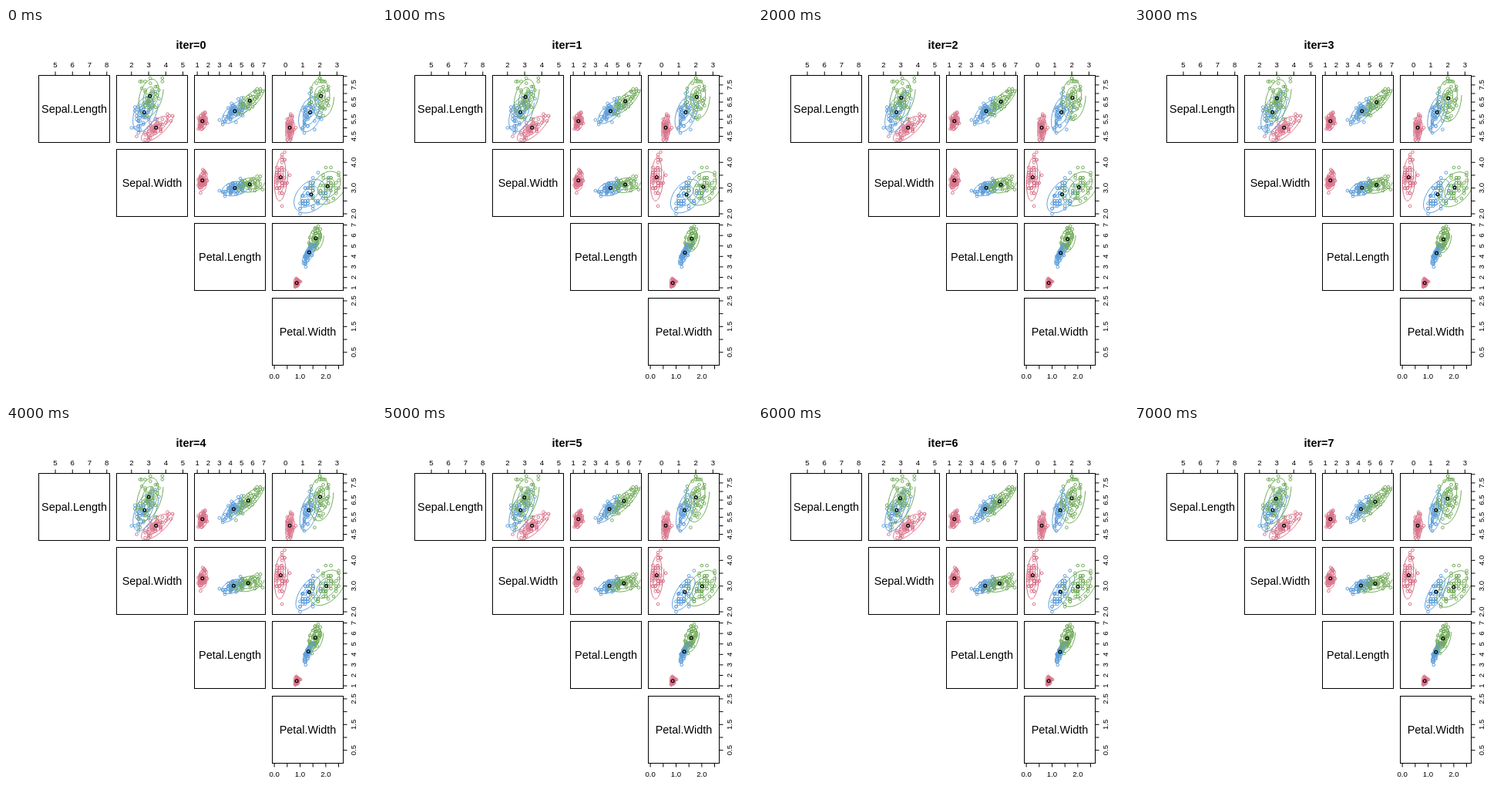
Animation of 480 by 480 pixels, one loop 8 s. Source, as an HTML page:

```html
<!DOCTYPE html>
<html lang="en">
<head>
<meta charset="utf-8">
<title>Mixture fit</title>
<style>
  html, body { margin: 0; width: 100%; height: 100%; overflow: hidden; background: #fff; }
  svg { display: block; width: 480px; height: 480px; }
  text { font-family: "Liberation Sans", Arial, sans-serif; text-anchor: middle; }
  .name { font-size: 14.4px; }
  .title { font-size: 14.4px; font-weight: bold; }
  .label { font-size: 9.6px; }
  .line { fill: none; stroke: #000; stroke-width: 1; }
  .dot, .curve { fill: none; stroke-width: 1; }
  .mean { fill: none; stroke: #000; stroke-width: 1.2; }
</style>
</head>
<body>
<svg id="stage" viewBox="0 0 480 480"></svg>
<script>
const STEP = 1000, STEPS = 8;
const W = 91.5, H = 86.5;
const COLORS = ["#d9738a", "#5f9fdb", "#72ac5a"];
const NAMES = ["Sepal.Length", "Sepal.Width", "Petal.Length", "Petal.Width"];
const LOW = [4.3, 2, 1, 0.1], HIGH = [7.9, 4.4, 6.9, 2.5];
const PAIRS = [[0, 1], [0, 2], [0, 3], [1, 2], [1, 3], [2, 3]];

// Each cluster: mean, deviation, correlation in the order of PAIRS.
const cluster = (mean, sd, cor) => ({ mean, sd, cor });
const red = cluster([5.006, 3.428, 1.462, 0.246], [0.352, 0.379, 0.174, 0.105],
  [0.743, 0.267, 0.278, 0.178, 0.233, 0.332]);
const START = [red,
  cluster([5.902, 2.748, 4.394, 1.434], [0.466, 0.296, 0.509, 0.297],
    [0.4, 0.64, 0.4, 0.32, 0.39, 0.8]),
  cluster([6.85, 3.074, 5.742, 2.071], [0.494, 0.29, 0.489, 0.28],
    [0.3, 0.77, -0.04, 0.18, 0.3, 0.18])];
const END = [red,
  cluster([5.915, 2.778, 4.204, 1.297], [0.525, 0.304, 0.448, 0.179],
    [0.607, 0.786, 0.58, 0.668, 0.79, 0.762]),
  cluster([6.545, 2.949, 5.48, 1.985], [0.622, 0.332, 0.572, 0.293],
    [0.446, 0.85, 0.338, 0.444, 0.576, 0.444])];
const SIZES = [50, 45, 55];

// Points at the rim of each cloud.
const RIM = [
  [[4.5, 2.3, 1.3, 0.3], [5.7, 4.4, 1.5, 0.4], [4.3, 3, 1.1, 0.1],
   [5, 3.5, 1.6, 0.6], [4.8, 3.4, 1.9, 0.2]],
  [[5, 2, 3.5, 1], [4.9, 2.4, 3.3, 1], [5.1, 2.5, 3, 1.1],
   [6, 2.2, 4, 1], [7, 3.2, 4.7, 1.4], [6.2, 2.2, 4.5, 1.5]],
  [[7.9, 3.8, 6.4, 2], [7.7, 3.8, 6.7, 2.2], [7.7, 2.6, 6.9, 2.3], [4.9, 2.5, 4.5, 1.7],
   [7.2, 3.6, 6.1, 2.5], [7.7, 2.8, 6.7, 2], [6.3, 3.3, 6, 2.5], [5.6, 2.8, 4.9, 2]]];

let seed = 20;
function random() {
  seed = (seed * 1664525 + 1013904223) % 4294967296;
  return seed / 4294967296;
}

function el(parent, tag, attrs, text) {
  const node = document.createElementNS("http://www.w3.org/2000/svg", tag);
  for (const key in attrs) node.setAttribute(key, attrs[key]);
  if (text !== undefined) node.textContent = text;
  parent.appendChild(node);
  return node;
}

const lerp = (a, b, p) => a.map((v, i) => v + (b[i] - v) * p);
const blend = (a, b, p) => cluster(lerp(a.mean, b.mean, p), lerp(a.sd, b.sd, p), lerp(a.cor, b.cor, p));

function corOf(c, i, j) {
  if (i === j) return 1;
  return c.cor[PAIRS.findIndex(q => q[0] === Math.min(i, j) && q[1] === Math.max(i, j))];
}

// Lower Cholesky factor of the covariance.
function factor(c) {
  const L = [[], [], [], []];
  for (let i = 0; i < 4; i++) for (let j = 0; j <= i; j++) {
    let s = corOf(c, i, j) * c.sd[i] * c.sd[j];
    for (let k = 0; k < j; k++) s -= L[i][k] * L[j][k];
    L[i][j] = i === j ? Math.sqrt(Math.max(s, 1e-4)) : s / L[j][j];
  }
  return L;
}

function logDensity(point, mean, L) {
  const z = [];
  let sum = 0;
  for (let i = 0; i < 4; i++) {
    let s = point[i] - mean[i];
    for (let k = 0; k < i; k++) s -= L[i][k] * z[k];
    z[i] = s / L[i][i];
    sum -= z[i] * z[i] / 2 + Math.log(L[i][i]);
  }
  return sum;
}

// Evenly spread normal scores in shuffled order.
function scores(n) {
  const list = Array.from({ length: n }, (_, i) => {
    const u = (i + 0.5) / n;
    return 4.91 * (u ** 0.14 - (1 - u) ** 0.14);
  });
  for (let i = n - 1; i > 0; i--) {
    const j = Math.floor(random() * (i + 1));
    [list[i], list[j]] = [list[j], list[i]];
  }
  return list;
}

function cloud(c, size, rim) {
  const n = size - rim.length, L = factor(c);
  const z = [0, 1, 2, 3].map(() => scores(n));
  const inner = Array.from({ length: n }, (_, k) => c.mean.map((m, i) => {
    let v = m;
    for (let j = 0; j <= i; j++) v += L[i][j] * z[j][k];
    return Math.round(Math.min(HIGH[i], Math.max(LOW[i], v)) * 10) / 10;
  }));
  return inner.concat(rim);
}

const points = END.flatMap((c, g) =>
  cloud(c, SIZES[g], RIM[g]).map(at => ({ at, first: g, dots: [] })));

// Equal units on both axes inside each panel.
const mid = LOW.map((v, i) => (v + HIGH[i]) / 2);
const span = LOW.map((v, i) => (HIGH[i] - v) * 1.08);
function panel(r, c) {
  const x = 42.5 + 101 * c, y = Math.round(62 + 96.2 * r) - 0.5;
  const k = Math.min(W / span[c], H / span[r]);
  return { r, c, x, y, k,
    px: v => x + 46 + (v - mid[c]) * k,
    py: v => y + 43.5 - (v - mid[r]) * k };
}

const stage = document.getElementById("stage");
const defs = el(stage, "defs", {});
const title = el(stage, "text", { class: "title", x: 240, y: 27 });
const plots = [];

for (let r = 0; r < 4; r++) for (let c = r; c < 4; c++) {
  const p = panel(r, c), box = { x: p.x, y: p.y, width: 92, height: 87 };
  if (r === c) {
    el(stage, "text", { class: "name", x: p.x + 46, y: p.y + 48 }, NAMES[r]);
  } else {
    const id = "clip" + r + c;
    el(el(defs, "clipPath", { id }), "rect", box);
    const g = el(stage, "g", { "clip-path": `url(#${id})` });
    for (const q of points)
      q.dots.push(el(g, "circle", { class: "dot", cx: p.px(q.at[c]), cy: p.py(q.at[r]), r: 1.85 }));
    p.curves = COLORS.map(stroke => el(g, "path", { class: "curve", stroke }));
    p.means = COLORS.map(() => el(g, "circle", { class: "mean", r: 1.9 }));
    plots.push(p);
  }
  el(stage, "rect", { class: "line", ...box });
}

function ticks(from, to, step) {
  const list = [];
  for (let v = from; v <= to + 1e-6; v += step) list.push(v);
  return list;
}

// Side is -1 for the top, 1 for the bottom; every skip-th tick has a label.
function axisX(p, side, list, skip, digits) {
  const y = side < 0 ? p.y : p.y + 87;
  const xs = list.map(p.px);
  let d = `M${xs[0]} ${y}H${xs[xs.length - 1]}`;
  xs.forEach((x, i) => {
    d += `M${x} ${y}v${5 * side}`;
    if (i % skip === 0)
      el(stage, "text", { class: "label", x, y: side < 0 ? y - 10.5 : y + 17.5 }, list[i].toFixed(digits));
  });
  el(stage, "path", { class: "line", d });
}

function axisY(p, list, skip, digits) {
  const x = p.x + 92, ys = list.map(p.py);
  let d = `M${x} ${ys[0]}V${ys[ys.length - 1]}`;
  ys.forEach((y, i) => {
    d += `M${x} ${y}h5`;
    if (i % skip === 0)
      el(stage, "text", { class: "label", transform: `translate(${x + 16.5} ${y}) rotate(-90)` },
        list[i].toFixed(digits));
  });
  el(stage, "path", { class: "line", d });
}

[[5, 8], [2, 5], [1, 7], [0, 3]].forEach(([a, b], c) => axisX(panel(0, c), -1, ticks(a, b, 1), 1, 0));
axisX(panel(3, 3), 1, ticks(0, 2.5, 0.5), 2, 1);
axisY(panel(0, 3), ticks(4.5, 8, 0.5), 2, 1);
axisY(panel(1, 3), ticks(2, 4, 0.5), 2, 1);
axisY(panel(2, 3), ticks(1, 7, 1), 1, 0);
axisY(panel(3, 3), ticks(0.5, 2.5, 0.5), 2, 1);

// Three widening turns around the mean, shaped by the covariance.
function spiral(p, c) {
  const rho = corOf(c, p.r, p.c), rest = Math.sqrt(1 - rho * rho);
  const n = 150;
  let d = "";
  for (let i = 0; i <= n; i++) {
    const a = 6 * Math.PI * i / n, rad = 2.7 * i / n;
    const u = rad * Math.cos(a), v = rad * Math.sin(a);
    const x = p.px(c.mean[p.c] + c.sd[p.c] * u);
    const y = p.py(c.mean[p.r] + c.sd[p.r] * (rho * u + rest * v));
    d += (i ? "L" : "M") + x.toFixed(2) + " " + y.toFixed(2);
  }
  return d;
}

function draw(iter) {
  const fit = START.map((c, g) => blend(c, END[g], (iter / STEPS) ** 0.85));
  const factors = fit.map(factor);
  title.textContent = "iter=" + iter;
  for (const q of points) {
    let g = q.first;
    if (g) {
      const [, a, b] = fit.map((c, i) => logDensity(q.at, c.mean, factors[i]));
      g = a > b ? 1 : 2;
    }
    for (const dot of q.dots) dot.setAttribute("stroke", COLORS[g]);
  }
  for (const p of plots) fit.forEach((c, g) => {
    p.curves[g].setAttribute("d", spiral(p, c));
    p.means[g].setAttribute("cx", p.px(c.mean[p.c]));
    p.means[g].setAttribute("cy", p.py(c.mean[p.r]));
  });
}

let shown = -1;
const begin = performance.now();
function tick() {
  const iter = Math.floor((performance.now() - begin) / STEP) % STEPS;
  if (iter !== shown) draw(shown = iter);
  requestAnimationFrame(tick);
}
tick();
</script>
</body>
</html>
```
